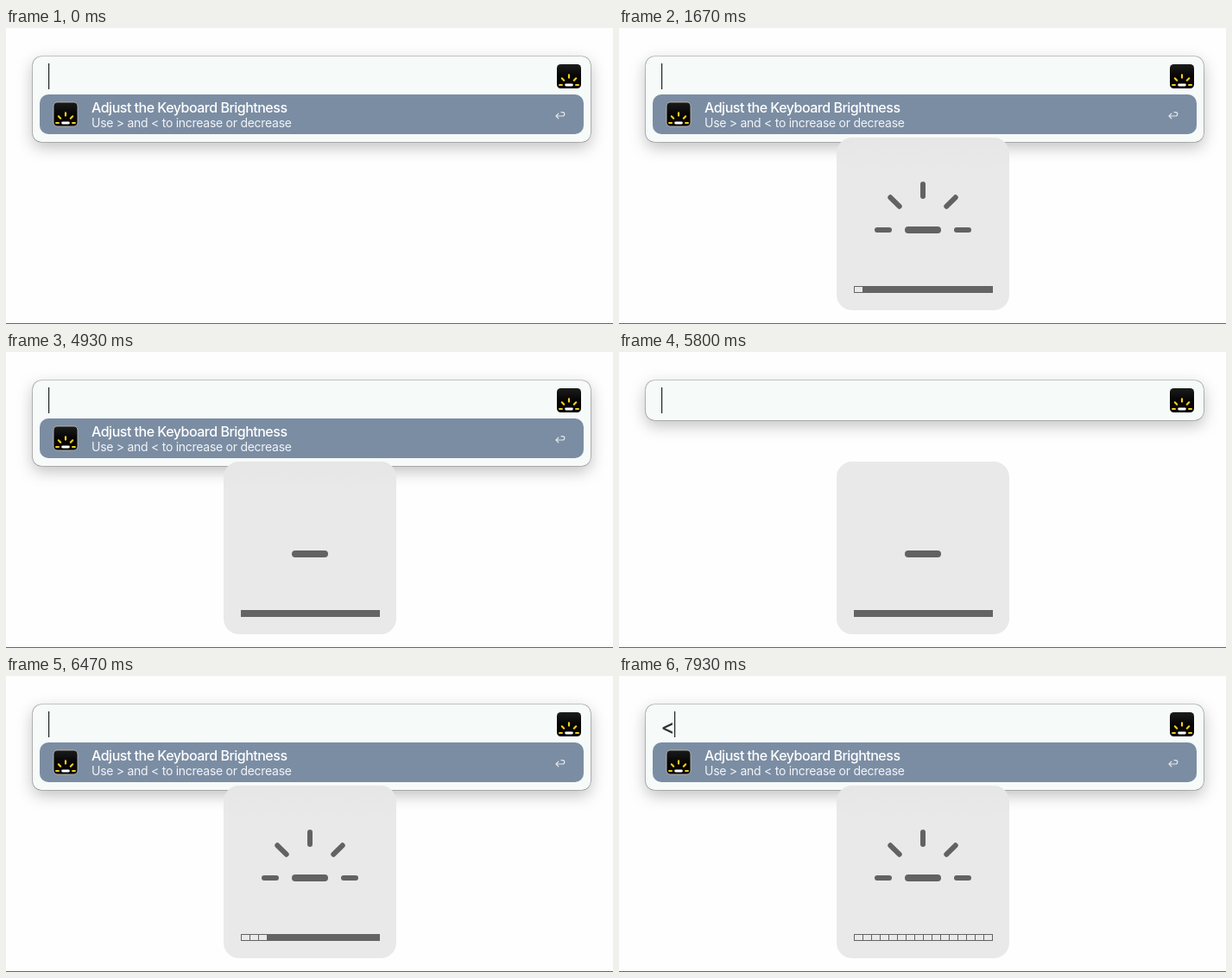
Animation of 703x343 px, one loop 8 s. Source, as an HTML page:

```html
<!DOCTYPE html>
<html lang="en">
<head>
<meta charset="utf-8">
<title>Keyboard brightness</title>
<style>
  html, body { margin: 0; width: 100%; height: 100%; overflow: hidden; background: #fefefe; }
  #stage { position: absolute; left: 0; top: 0; width: 703px; height: 343px; overflow: hidden; }
  #panel {
    position: absolute; left: 31px; top: 33px; width: 646px; height: 99px;
    border-radius: 10px; background: #f6faf9;
    box-shadow: 0 0 0 .6px rgba(0, 0, 0, .38), 0 6px 18px rgba(0, 0, 0, .25);
  }
  svg { position: absolute; left: 0; top: 0; }
  text { font-family: Inter, "Open Sans", sans-serif; }
  .title { font-size: 16px; font-weight: 500; letter-spacing: -.5px; fill: #fff; }
  .sub { font-size: 14px; letter-spacing: -.27px; fill: #f1f4f7; }
  .query { font-size: 24px; font-weight: 500; fill: #333; }
  .line { fill: none; stroke-linecap: round; stroke-linejoin: round; }
</style>
</head>
<body>
<div id="stage">
  <div id="panel"></div>
  <svg width="703" height="343" viewBox="0 0 703 343">
    <defs>
      <linearGradient id="night" x2="0" y2="1">
        <stop offset="0" stop-color="#1c1c1c"/>
        <stop offset=".5" stop-color="#050505"/>
      </linearGradient>
      <linearGradient id="glass" x2="0" y2="1">
        <stop offset="0" stop-color="#e6e6e6"/>
        <stop offset=".18" stop-color="#e9e9e9"/>
      </linearGradient>
      <g id="icon">
        <rect width="28" height="28" rx="4.5" fill="url(#night)"/>
        <path class="line" stroke="#f7cf1d" stroke-width="2.2"
          d="M14 12.4V15.6M5.8 16.3L8.2 18.7M22.2 16.3L19.8 18.7M3.1 24H5.9M22.1 24H24.9"/>
        <path class="line" stroke="#fff" stroke-width="2.8" d="M10.6 24H17.4"/>
      </g>
    </defs>

    <text id="query" class="query" x="48.6" y="67"></text>
    <rect id="caret" y="41" width="1.2" height="30" fill="#222"/>
    <use href="#icon" x="638" y="42"/>

    <g id="row">
      <rect x="39" y="77" width="630" height="46" rx="10" fill="#7b8da3"/>
      <use href="#icon" x="55" y="86"/>
      <rect x="55" y="86" width="28" height="28" rx="4.5" fill="none" stroke="#c9c5b8" stroke-width=".8"/>
      <text class="title" x="99" y="98">Adjust the Keyboard Brightness</text>
      <text class="sub" x="99" y="115">Use &gt; and &lt; to increase or decrease</text>
      <path class="line" stroke="#e3e8ed" stroke-width="1.2"
        d="M637 102H644.6A2.2 2.2 0 0 0 644.6 97.6H643M639.8 99.2L637 102L639.8 104.8"/>
    </g>

    <g id="hud">
      <rect id="sheet" x="252" y="127" width="200" height="200" rx="18"/>
      <path class="line" stroke="#626262" stroke-width="8" d="M335 234H369"/>
      <path id="rays" class="line" stroke="#626262" stroke-width="6"
        d="M352 181V195M314.3 196.3L324.7 206.7M389.7 196.3L379.3 206.7M299 234H313M391 234H405"/>
      <rect x="272" y="299" width="161" height="8" fill="#646464"/>
      <g id="cells" fill="#e9e9e9"></g>
    </g>
    <rect y="342" width="703" height="1" fill="#666"/>
  </svg>
</div>
<script>
  const LOOP = 8000, CELLS = 16;
  const el = id => document.getElementById(id);
  const show = (node, on) => node.setAttribute('visibility', on ? 'inherit' : 'hidden');

  // [start, value]: each value holds until the next start
  const levels = [
    [0, -1], [670, 1], [1730, 2], [2730, 3], [3400, 4],
    [4330, 3], [4530, 2], [4730, 1], [4930, 0]
  ];
  const queries = [
    [0, ''], [200, '>'], [530, ''], [1130, '>'], [1470, ''],
    [2130, '>'], [2470, ''], [3070, '>'], [3330, ''], [3870, '<'], [4130, '']
  ];
  const pulse = (key, from, to) => {
    for (let t = from; t < to; t += 200) queries.push([t, key], [t + 65, '']);
  };
  pulse('<', 4265, 4700);
  pulse('<', 5200, 5650);
  pulse('>', 6200, 7450);
  queries.push([7930, '<']);

  const at = (steps, t) => {
    let value = steps[0][1];
    for (const [start, v] of steps) if (t >= start) value = v;
    return value;
  };

  // Holding the key: slow repeat first, then faster until full
  const levelAt = t => {
    if (t < 6130) return at(levels, t);
    if (t < 6930) return Math.min(6, 1 + Math.floor((t - 6130) / 133));
    return Math.min(CELLS, 7 + Math.floor((t - 6930) / 60));
  };

  const cells = Array.from({ length: CELLS }, (_, i) => {
    const r = document.createElementNS('http://www.w3.org/2000/svg', 'rect');
    const box = { x: 273 + 10 * i, y: 300, width: 9, height: 6 };
    for (const k in box) r.setAttribute(k, box[k]);
    return el('cells').appendChild(r);
  });

  function draw(t) {
    const level = levelAt(t), query = at(queries, t);
    const open = t < 5670 || t >= 6070;
    el('query').textContent = query;
    el('caret').setAttribute('x', query ? 64 : 49);
    el('panel').style.height = (open ? 99 : 46) + 'px';
    show(el('row'), open);
    show(el('hud'), level >= 0);
    show(el('rays'), level > 0);
    el('sheet').setAttribute('fill', open ? 'url(#glass)' : '#e9e9e9');
    cells.forEach((c, i) => show(c, i < level));
  }

  const begin = performance.now();
  function tick() {
    draw((performance.now() - begin) % LOOP);
    requestAnimationFrame(tick);
  }
  tick();
</script>
</body>
</html>
```
